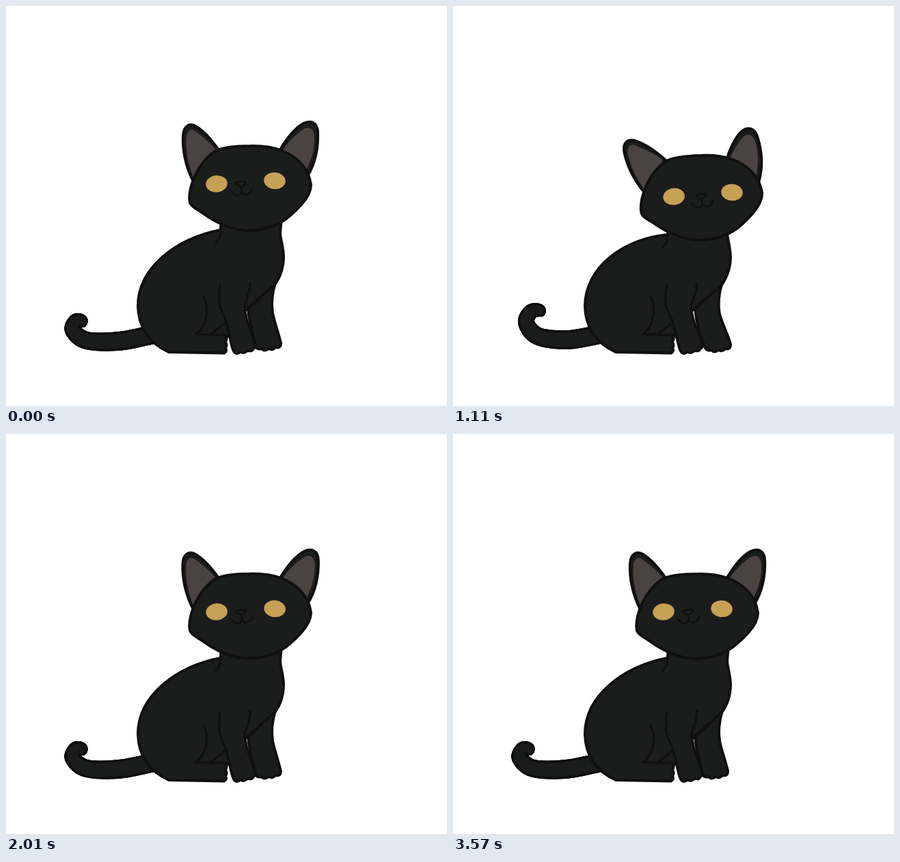
These frames come from a looping animation (645 by 586 pixels, 3600 ms). An HTML page with a canvas:

```html
<!DOCTYPE html>
<html lang="en">
<head>
<meta charset="utf-8">
<title>Black cat</title>
<style>
  html, body { margin: 0; width: 100%; height: 100%; overflow: hidden; background: #fff; }
  canvas { display: block; }
</style>
</head>
<body>
<canvas id="stage" width="645" height="586"></canvas>
<script>
const ctx = document.getElementById('stage').getContext('2d');
const LOOP = 3600, STEP = 30;
const FUR = '#1b1d1c', LINE = '#0f100f', EAR = '#4a4341', EYE = '#c6a055';

// lowered x, y, lifted x, y, radius
const TAIL_JOINTS = [
  [212, 482, 210, 480, 14], [165, 491, 177, 479, 14],
  [118, 490, 152, 457, 13], [98, 475, 141, 425, 12],
  [102, 462, 150, 405, 11], [110, 461, 166, 405, 9.5],
  [112, 465, 166, 415, 6]
];

const mix = (a, b, k) => a + (b - a) * k;

// Smooth rise to 1 at the peak time and back to 0
function bump(t, peak, rise, fall = rise) {
  const d = (t - peak) / (t < peak ? rise : fall);
  return Math.abs(d) < 1 ? Math.cos(d * Math.PI / 2) ** 2 : 0;
}

function poseAt(t) {
  const look = bump(t, 380, 380);
  const duck = bump(t, 480, 260);
  const right = bump(t, 820, 250) + bump(t, 1390, 200);
  const dip = bump(t, 1110, 250);
  const peek = bump(t, 1670, 330);
  const flare = bump(t, 2700, 800);
  const stretch = bump(t, 3000, 480);
  return {
    tilt: 6 * right - 10.5 * look - 1.2 * dip - 6 * peek,
    x: 5 * right + 7.5 * dip - 3 * peek,
    y: 16 * duck + 2 * right + 14 * dip - 3 * flare - 7 * stretch,
    sway: 9 * right - 21 * look - 14 * dip - 14.5 * peek + 3 * flare,
    spread: 14 * flare,
    faceX: 14 * look + 5 * right + 9 * dip + 6 * peek + 3 * flare,
    faceY: 3 * look + 4 * dip + peek + 2 * flare - 4 * stretch,
    bend: look + 0.1 * dip,
    pawX: 5 * look + 4 * dip + 6 * peek - 3 * flare,
    pawY: 4 * look + 2 * dip - 5 * peek,
    lift: 1.13 * bump(t, 540, 540, 850) + 0.4 * bump(t, 2640, 510, 520)
  };
}

function shape(d, fill, width = 4) {
  const path = new Path2D(d);
  if (fill) {
    ctx.fillStyle = fill;
    ctx.fill(path);
  }
  if (width) {
    ctx.lineWidth = width;
    ctx.strokeStyle = LINE;
    ctx.stroke(path);
  }
}

function turned(x, y, degrees, draw) {
  ctx.save();
  ctx.translate(x, y);
  ctx.rotate(degrees * Math.PI / 180);
  ctx.translate(-x, -y);
  draw();
  ctx.restore();
}

function spline(p, a, b, q, k) {
  return a + k / 2 * (b - p + k * (2 * p - 5 * a + 4 * b - q + k * (3 * (a - b) + q - p)));
}

function drawTail(lift) {
  // The tip leads, the base follows
  const joints = TAIL_JOINTS.map(([x, y, x1, y1, r], i) => {
    const k = lift ** (1.5 - 0.1 * i);
    return [mix(x, x1, k), mix(y, y1, k), r];
  });
  const last = joints.length - 1;
  const joint = i => joints[Math.max(0, Math.min(last, i))];
  for (const [color, inset] of [[LINE, 0], [FUR, 3.5]]) {
    ctx.fillStyle = color;
    for (let s = 0; s < last; s += 0.04) {
      const i = Math.floor(s);
      const [x, y, r] = joint(i).map((v, c) =>
        spline(joint(i - 1)[c], v, joint(i + 1)[c], joint(i + 2)[c], s - i));
      ctx.beginPath();
      ctx.arc(x, y, r - inset, 0, 7);
      ctx.fill();
    }
  }
}

function drawBody({ bend: b, pawX, pawY, y }) {
  const drop = y / 2;
  // Far front leg
  shape(`M${394 - 7 * b} ${405 + 14 * b} C${388 - 3 * b} 425 ${388 - 3 * b} 438 ${390 - 4 * b} 450
    C393 465 ${399 + pawX} ${480 + pawY} ${402 + pawX} ${494 + pawY}
    q0 8 -8 6 q-4 5 -10 2 q-6 5 -10 0 q-6 2 -9 -3 C362 485 356 465 354 444Z`, FUR);
  // Torso and haunch
  shape(`M315 300 L314 ${328 + drop} C248 341 193 384 193 440 C194 475 212 495 238 507
    L319 508.5 q5 -3 2 -7 q3 -5 0 -9 q3 -6 0 -9 L326 484 L${350 - 6 * b} ${446 + 6 * b}
    L${393 - 7 * b} ${408 + 15 * b} C${402 - 2 * b} 396 406 382 ${406 - b} ${366 + 8 * b}
    C405 350 401 340 401 332 L404 300Z`, FUR);
  shape(`M302 479 L322 463 M314 ${331 + drop} q0 8 -7 16`, null, 3);
  shape('M289 426 C297 442 295 468 278 481 L318 482 q4 1 4 4', null, 3.5);
  // Near front leg
  shape(`M${313 - 2 * b} 408 C${311 - 6 * b} 420 ${312 - 14 * b} 428 ${312 - 13 * b} 437
    C${314 - 12 * b} 447 ${319 - 8 * b} ${453 + 4 * b} ${322 - 6 * b} ${463 + 3 * b}
    C${327 - 2 * b} 480 329 500 333 506 q4 6 10 1 q6 3 10 -2 q7 2 9 -3 q5 -2 2 -7
    C361 482 ${353 - 2 * b} 468 ${351 - 8 * b} 453
    Q${349 - 6 * b} 446 ${349 - 12 * b} 440 C${351 - 10 * b} 430 ${356 - 9 * b} 426 ${357 - 5 * b} ${406 + 11 * b}`, FUR, 3.5);
}

function drawEye(x, y, tilt) {
  ctx.fillStyle = EYE;
  ctx.beginPath();
  ctx.ellipse(x, y, 15.8, 12.3, tilt, 0, 7);
  ctx.fill();
}

function drawHead({ tilt, x, y, sway, spread, faceX, faceY }) {
  ctx.save();
  ctx.translate(x, y);
  turned(352, 330, tilt, () => {
    turned(289, 248, sway - spread, () => {
      shape('M275 259 C262 235 258 209 259 190 C260 174 270 171 279 177 C294 187 304 201 314 215 L300 250Z', FUR);
      shape('M274 251 C266 233 262 205 264 191 C266 180 273 179 280 186 C291 194 301 203 310 214 L298 245Z', EAR, 0);
    });
    turned(425, 244, sway + spread, () => {
      shape('M441 249 C453 229 457 206 456 184 C455 170 445 167 435 172 C421 180 410 195 400 212 L415 245Z', FUR);
      shape('M439 241 C449 221 452 205 451 190 C449 177 441 176 433 182 C422 190 412 200 404 212 L415 242Z', EAR, 0);
    });
    shape(`M358 205 C392 204 415 214 430 229 C441 241 444 250 446 262 C446 272 441 281 432 291
      C421 303 411 312 402 317 C386 326 369 329 352 329 C329 328 305 316 290 305
      C280 298 271 294 269 288 C267 280 270 266 273 257 C279 241 290 224 305 213
      C318 206 340 205 358 205Z`, FUR);
    ctx.translate(faceX, faceY);
    drawEye(308, 260.5, -0.1);
    drawEye(393, 256, 0.1);
    // The muzzle turns further than the eyes
    ctx.translate(faceX * 0.5, 0);
    shape(`M336 259 Q344 256 351 258 Q350 262 344 265 Q338 263 336 259Z M344 265 L345 273
      M329 271 C333 278 342 280 345 273 C350 279 358 276 360 267`, null, 2.5);
  });
  ctx.restore();
}

function render(now) {
  const pose = poseAt(Math.floor(now % LOOP / STEP) * STEP);
  ctx.clearRect(0, 0, 645, 586);
  drawTail(pose.lift);
  drawBody(pose);
  drawHead(pose);
}

ctx.lineCap = ctx.lineJoin = 'round';
const start = performance.now();
function tick() {
  render(performance.now() - start);
  requestAnimationFrame(tick);
}
tick();
</script>
</body>
</html>
```
